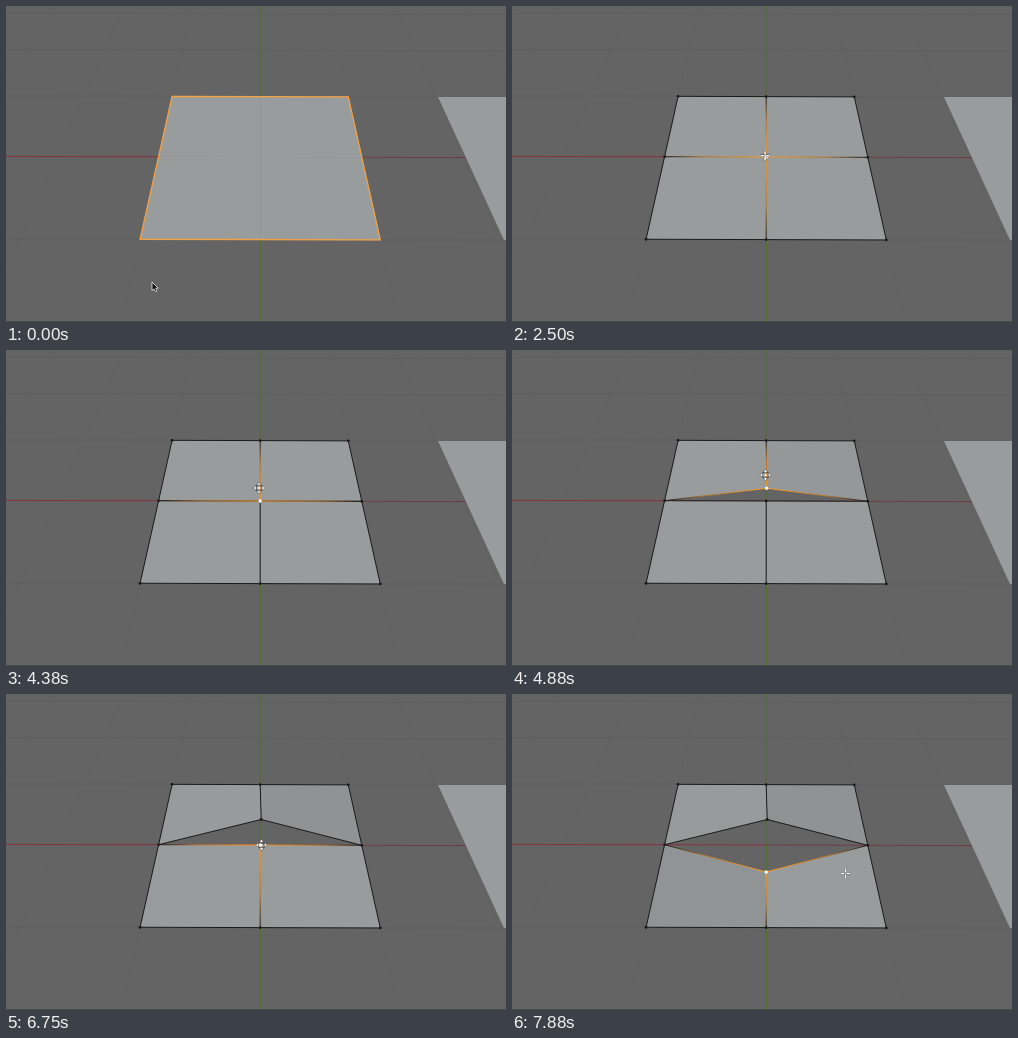
An HTML page for the animation above (8 s loop, 500 px wide and 316 px high).

```html
<!DOCTYPE html>
<html lang="en">
<head>
<meta charset="utf-8">
<title>Splitting a vertex</title>
<style>
html, body { margin: 0; width: 100%; height: 100%; overflow: hidden; background: #646464; }
svg { display: block; width: 100%; height: 100%; }
</style>
</head>
<body>
<svg viewBox="0 0 500 316">
  <defs id="defs"></defs>
  <rect width="500" height="316" fill="#646464"/>
  <g id="grid" stroke="#5c5c5c" fill="none"></g>
  <g fill="none">
    <path d="M0 150.4L254 151" stroke="#87313b"/>
    <path d="M254 151L460 151.6" stroke="#713c40"/>
    <path d="M254.2 0V151" stroke="#556638"/>
    <path d="M254.2 151V316" stroke="#4c751f"/>
  </g>
  <path d="M432 91H500V234H498Z" fill="#989c9c"/>
  <g id="faces"></g>
  <path id="outline" fill="none" stroke="#f5a040" stroke-width="1.3"/>
  <g id="mesh">
    <g id="edges" fill="none"></g>
    <g id="dots"></g>
  </g>
  <path d="M0 315.5H500" stroke="#4b4b4b"/>
  <g id="arrow">
    <path d="M0 0V8.6L2 6.9L3.4 9.6L5 8.8L3.7 6.2H6.2Z" fill="#111" stroke="#eee" stroke-width=".8"/>
  </g>
  <g id="cross" fill="none">
    <path d="M-4.6 0H-1.2M1.2 0H4.6M0 -4.6V-1.2M0 1.2V4.6" stroke="#555" stroke-width="2.6"/>
    <path d="M-4.4 0H-1.2M1.2 0H4.4M0 -4.4V-1.2M0 1.2V4.4" stroke="#fff" stroke-width="1.5"/>
  </g>
  <g id="move">
    <circle r="3.4" fill="none" stroke="#333"/>
    <path d="M0 -5.8L2.4 -2.8H-2.4ZM0 5.8L2.4 2.8H-2.4ZM-5.8 0L-2.8 -2.4V2.4ZM5.8 0L2.8 -2.4V2.4Z" fill="#fff" stroke="#333" stroke-width=".5"/>
    <circle r="1.1" fill="#fff"/>
  </g>
</svg>
<script>
const NS = 'http://www.w3.org/2000/svg';
const LOOP = 8000, STEP = 125;
const EDIT = 1000, SELECT = 2250, RIP = 4375, DROP = 5375, PICK = 6125, GRAB = 6750, RELEASE = 7625;
const INK = '#1a1a1a';
const $ = id => document.getElementById(id);

function set(el, attrs) {
  for (const k in attrs) el.setAttribute(k, attrs[k]);
  return el;
}
function add(parent, tag, attrs = {}) {
  return parent.appendChild(set(document.createElementNS(NS, tag), attrs));
}
const show = (el, on) => el.setAttribute('display', on ? 'inline' : 'none');
const line = pts => 'M' + pts.map(p => p.join(' ')).join('L');

const ease = (t, from, to) => {
  const p = Math.min(1, Math.max(0, (t - from) / (to - from)));
  return p * p * (3 - 2 * p);
};
const mix = (a, b, p) => a.map((v, i) => v + (b[i] - v) * p);

// Perspective floor, tilted very slightly
const floor = (u, y) => {
  const x = u * (y + 303) * .2238;
  return [254.2 + x, y + x * .003];
};
for (const y of [8, 44, 90.6, 233.6])
  add($('grid'), 'path', { d: line([floor(-6, y), floor(6, y)]), opacity: .75 });
for (let i = -6; i <= 6; i++)
  if (i) add($('grid'), 'path', { d: line([floor(i, 0), floor(i, 316)]), opacity: .18 });

const [TL, TM, TR] = [-1, 0, 1].map(u => floor(u, 90.6));
const [ML, MID, MR] = [-1, 0, 1].map(u => floor(u, 151));
const [BL, BM, BR] = [-1, 0, 1].map(u => floor(u, 233.6));
const UP = [255.2, 125.5], LOW = [254.2, 178];
const border = line([TL, TR, BR, BL]) + 'Z';

// Pointer: one sweep, then eased legs of start, end and destination
const SWEEP = [[146, 276], [90, -70], [560, 70], [221, 148]];
const legs = [
  [1375, 2000, [255, 160]],
  [2125, 2750, [252, 144]],
  [3625, 4250, [253, 138]],
  [RIP, DROP, [254, 112]],
  [DROP, 5625, [262, 156]],
  [5625, 6000, [255.5, 151]],
  [GRAB, RELEASE, [255.5, 178]],
  [7500, 7875, [333.5, 179.5]]
];
function bezier(pts, p) {
  while (pts.length > 1) pts = pts.slice(1).map((b, i) => mix(pts[i], b, p));
  return pts[0];
}
const pointer = t => legs.reduce(
  (pos, [from, to, dest]) => mix(pos, dest, ease(t, from, to)),
  bezier(SWEEP, Math.min(1, t / 900)));

const shade = drop => {
  const v = Math.round(152 - drop);
  return `rgb(${v},${v + 4},${v + 4})`;
};

const faces = Array.from({ length: 4 }, () => add($('faces'), 'path'));
set($('outline'), { d: border });
add($('edges'), 'path', { d: border, stroke: INK });

// Edges that meet a centre vertex, fading from the selected end
function spoke(id, end) {
  const grad = add($('defs'), 'linearGradient', { id, gradientUnits: 'userSpaceOnUse' });
  [[0, '#ff9c24'], [.6, '#b47530'], [1, INK]].forEach(([offset, color]) =>
    add(grad, 'stop', { offset, 'stop-color': color }));
  const path = add($('edges'), 'path');
  return (from, selected, visible) => {
    set(grad, { x1: from[0], y1: from[1], x2: end[0], y2: end[1] });
    set(path, { d: line([from, end]), stroke: selected ? `url(#${id})` : INK });
    show(path, visible);
  };
}
const lowerSpokes = [BM, ML, MR].map((p, i) => spoke('low' + i, p));
const upperSpokes = [TM, ML, MR].map((p, i) => spoke('up' + i, p));

const dot = p => add($('dots'), 'circle', { cx: p[0], cy: p[1], r: 1.4, fill: INK });
[TL, TM, TR, ML, MR, BL, BM, BR].forEach(dot);
const lowerDot = dot(MID), upperDot = dot(MID);
const placeDot = (el, p, selected) =>
  set(el, { cx: p[0], cy: p[1], fill: selected ? '#fff' : INK, r: selected ? 1.7 : 1.4 });

function draw(time) {
  const t = Math.floor((time % LOOP) / STEP) * STEP;
  const lift = ease(t, RIP, DROP), sink = ease(t, GRAB, RELEASE);
  const up = mix(MID, UP, lift), low = mix(MID, LOW, sink);
  const editing = t >= EDIT, split = t >= RIP;
  const upSel = t >= SELECT && t < PICK;
  const lowSel = t >= SELECT && !split || t >= PICK;

  [
    [[TL, TM, up, ML], lift],
    [[TM, TR, MR, up], 9 * lift],
    [[ML, low, BM, BL], 8 * sink],
    [[low, MR, BR, BM], 0]
  ].forEach(([pts, drop], i) => {
    const fill = shade(drop);
    set(faces[i], { d: line(pts) + 'Z', fill, stroke: editing ? 'none' : fill, 'stroke-width': .6 });
  });

  show($('outline'), !editing);
  show($('mesh'), editing);
  // Until the rip, both halves share their side edges
  lowerSpokes.forEach((s, i) => s(low, lowSel, split || i === 0));
  upperSpokes.forEach(s => s(up, upSel, true));
  placeDot(lowerDot, low, lowSel);
  placeDot(upperDot, up, upSel);
  show(lowerDot, t > RIP);

  const moving = t >= RIP && t <= DROP || t >= GRAB && t <= RELEASE;
  const current = !editing ? 'arrow' : moving ? 'move' : 'cross';
  const at = `translate(${pointer(t).join(' ')})`;
  for (const id of ['arrow', 'cross', 'move']) {
    show($(id), id === current);
    set($(id), { transform: at });
  }
}

const start = performance.now();
function tick() {
  draw(performance.now() - start);
  requestAnimationFrame(tick);
}
tick();
</script>
</body>
</html>
```
